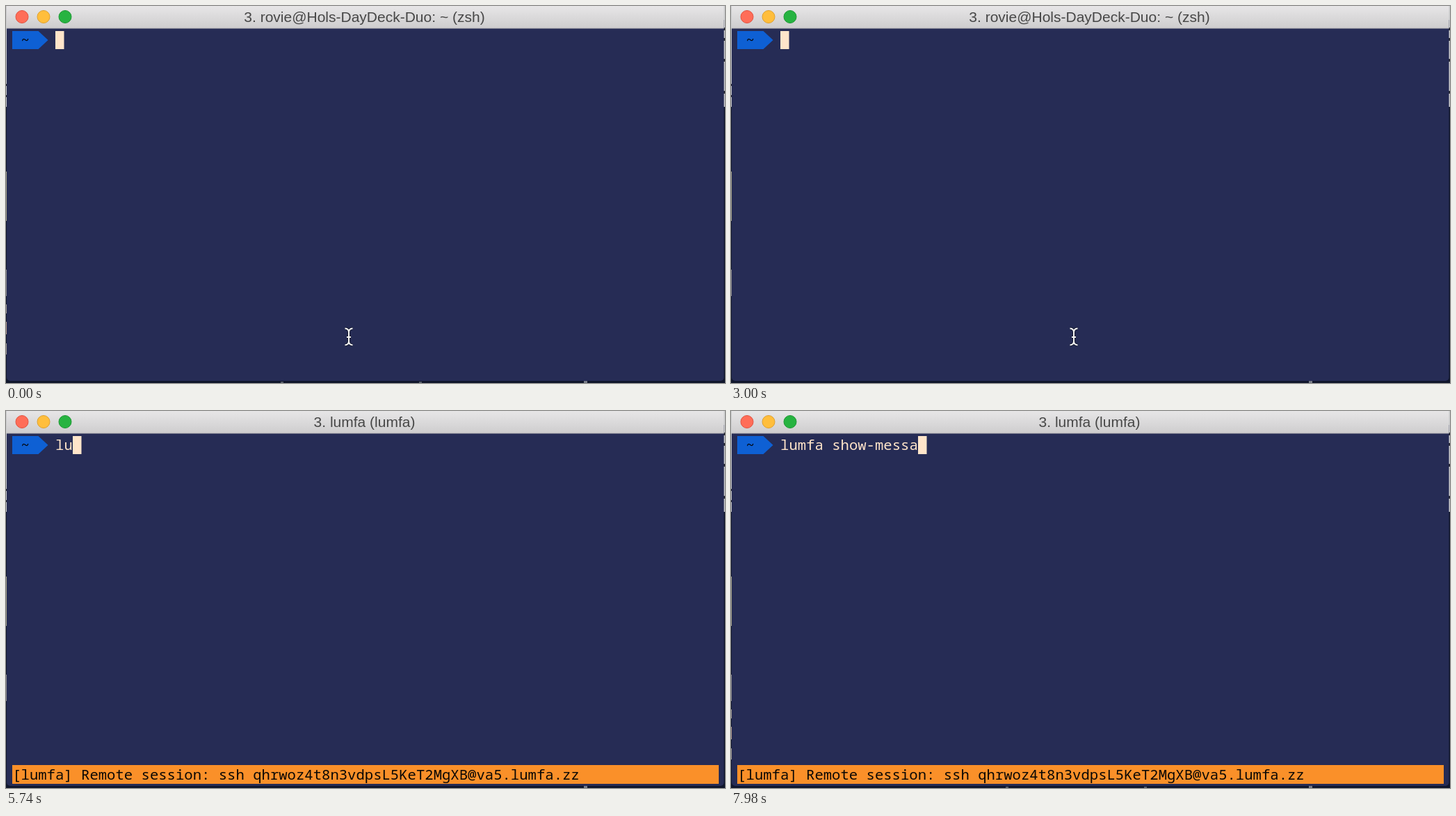
These frames come from a looping animation (1034 px wide and 542 px high, 8000 ms). An HTML page with a canvas:

```html
<!DOCTYPE html>
<html lang="en">
<head>
<meta charset="utf-8">
<title>Terminal</title>
<style>
  html, body { margin: 0; width: 100%; height: 100%; overflow: hidden; background: #10162b; }
  canvas { display: block; }
</style>
</head>
<body>
<canvas id="stage" width="1034" height="542"></canvas>
<script>
const ctx = document.getElementById('stage').getContext('2d');
const LOOP = 8000, CELL = 12.37, LEFT = 9.2;
const MONO = '20.6px "Noto Sans Mono", "DejaVu Sans Mono", monospace';
const SANS = '21px "Liberation Sans", Arial, sans-serif';
const CREAM = '#ffe5ca';

// Moments of the session, in ms
const FIRST_KEY = 3200, LAUNCH = 4200, CONNECTED = 5000, SECOND_KEY = 5560;

function rect(color, x, y, w, h) {
  ctx.fillStyle = color;
  ctx.fillRect(x, y, w, h);
}

function text(str, x, y, color, font = MONO, align = 'left') {
  ctx.font = font;
  ctx.textAlign = align;
  ctx.fillStyle = color;
  ctx.fillText(str, x, y);
}

function typed(str, t, start, step) {
  return str.slice(0, Math.max(0, Math.floor((t - start) / step) + 1));
}

function cursor(col) {
  rect(CREAM, Math.round(LEFT + col * CELL), 36, 12.5, 26);
}

// Slivers of the windows behind the terminal
function backdrop(t) {
  rect('#10162b', 0, 0, 1034, 542);
  rect('#c9cacb', 0, 0, 2, 145);
  rect('#c9cacb', 1032, 0, 2, 145);
  for (const y of [31, 46, 76, 122]) rect('#26282f', 1032, y, 2, 4);
  for (const y of [112, 128]) rect('#26282f', 0, y, 2, 3);
  rect('#a8a58c', 0, 238, 2, 71);
  rect('#8d8d8d', 0, 379, 2, 38);
  rect('#777b86', 831, 539, 5, 3);
  if (t < 2400 || t > 7100) rect('#a19b93', 0, 429, 2, 13);
  if (t < 2400 || t > 7600) {
    rect('#b59c8d', 0, 454, 2, 18);
    rect('#a19b93', 0, 485, 2, 16);
    rect('#555b68', 395, 540, 4, 2);
    rect('#555b68', 594, 540, 4, 2);
  }
}

function frame(title) {
  ctx.fillStyle = '#262c55';
  ctx.beginPath();
  ctx.roundRect(1, 20, 1031.5, 519, [0, 0, 5, 5]);
  ctx.fill();
  const bar = ctx.createLinearGradient(0, 0, 0, 32);
  bar.addColorStop(0, '#e7e6e7');
  bar.addColorStop(1, '#cecdce');
  rect(bar, 1, 0, 1031.5, 32);
  rect('#b5b4b8', 1, 31.5, 1031.5, 1);
  [['#ff6d58', '#e2513f'], ['#ffbe3c', '#e0a02b'], ['#27b341', '#1c9832']].forEach(([fill, rim], i) => {
    ctx.beginPath();
    ctx.arc(23 + 31 * i, 15.5, 9, 0, 7);
    ctx.fillStyle = fill;
    ctx.fill();
    ctx.strokeStyle = rim;
    ctx.lineWidth = 1;
    ctx.stroke();
  });
  text(title, 515.5, 23, '#474747', SANS, 'center');
}

function prompt(command) {
  ctx.fillStyle = '#0e60d4';
  ctx.beginPath();
  for (const [x, y] of [[9, 36], [46.5, 36], [60.5, 49], [46.5, 62], [9, 62]]) ctx.lineTo(x, y);
  ctx.fill();
  text('~', LEFT + CELL, 56, '#05070d');
  text(command, LEFT + 5 * CELL, 56, CREAM);
  cursor(5 + command.length);
}

function status(message) {
  rect('#fa9029', 9, 509, 1016, 27);
  text('[lumfa] ' + message, LEFT, 530, '#0b0805');
}

function pointer() {
  const beam = new Path2D('M487.5 463.5Q493 464 493 469V482Q493 487 487.5 487.5M498.5 463.5Q493 464 493 469M493 482Q493 487 498.5 487.5M490 476H496');
  for (const [color, width] of [['#15192f', 4], ['#f4f4f4', 2]]) {
    ctx.strokeStyle = color;
    ctx.lineWidth = width;
    ctx.stroke(beam);
  }
}

function draw() {
  const t = performance.now() % LOOP;
  backdrop(t);
  if (t < LAUNCH) {
    frame('3. rovie@Hols-DayDeck-Duo: ~ (zsh)');
    prompt(typed('lumfa', t, FIRST_KEY, 140));
    if (t < FIRST_KEY) pointer();
  } else if (t < CONNECTED) {
    frame('3. lumfa (zsh)');
    cursor(0);
    status('Connecting to keeper.lumfa.zz...');
  } else {
    frame('3. lumfa (lumfa)');
    prompt(typed('lumfa show-messages', t, SECOND_KEY, 160));
    status('Remote session: ssh qhrwoz4t8n3vdpsL5KeT2MgXB@va5.lumfa.zz');
  }
  requestAnimationFrame(draw);
}
draw();
</script>
</body>
</html>
```
